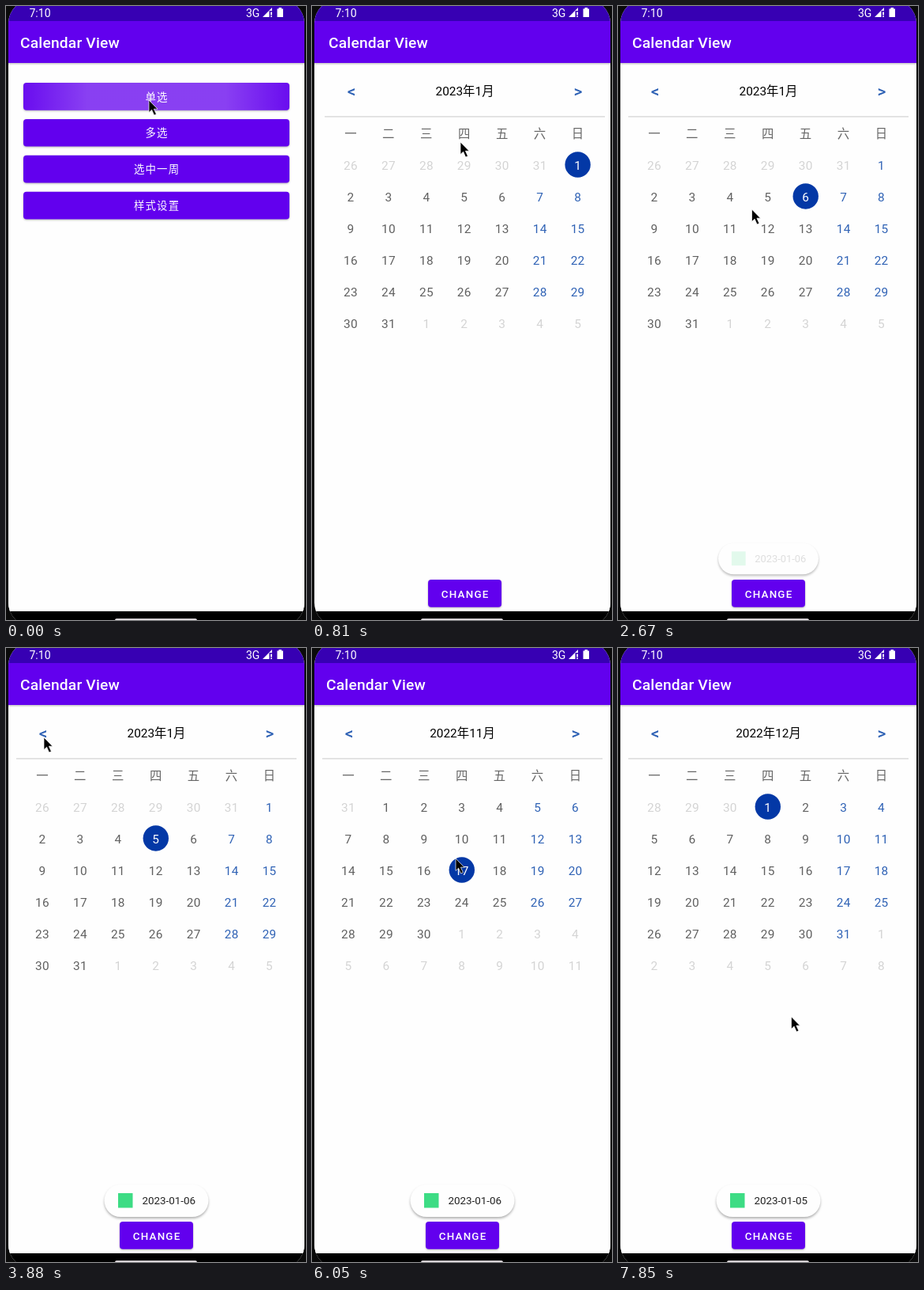
Write an HTML page that moves like this. It is 380 by 776 pixels and loops after 8000 ms.

```html
<!DOCTYPE html>
<html lang="zh-CN">
<head>
<meta charset="utf-8">
<title>Calendar View</title>
<style>
html, body { margin: 0; width: 100%; height: 100%; overflow: hidden; background: #0a0a0a; }
svg { display: block; font-family: Roboto, 'Noto Sans CJK SC', 'Noto Sans CJK', sans-serif; }
.btn { filter: drop-shadow(0 1.2px 1px rgba(0, 0, 0, .28)); }
.pill { filter: drop-shadow(0 2px 1.8px rgba(0, 0, 0, .3)); }
.label { font-size: 13.4px; letter-spacing: 1.2px; font-weight: 500; }
.title { font-size: 19.2px; letter-spacing: .2px; font-weight: 500; }
.day { font-size: 15.4px; letter-spacing: .3px; }
.month { font-size: 15.4px; }
.arrow { font-size: 21px; font-weight: 500; }
.small { font-size: 13.4px; }
</style>
</head>
<body>
<svg width="380" height="776" viewBox="0 0 380 776">
  <defs>
    <clipPath id="screen"><rect x="3" y="-8" width="375" height="792" rx="30"/></clipPath>
    <clipPath id="pager"><rect x="13" y="176" width="355" height="245"/></clipPath>
    <linearGradient id="ripple">
      <stop offset="0" stop-color="#fff" stop-opacity=".05"/>
      <stop offset=".24" stop-color="#fff" stop-opacity=".25"/>
      <stop offset=".76" stop-color="#fff" stop-opacity=".25"/>
      <stop offset="1" stop-color="#fff" stop-opacity=".05"/>
    </linearGradient>
    <linearGradient id="shade" x2="0" y2="1">
      <stop offset="0" stop-opacity=".22"/><stop offset="1" stop-opacity="0"/>
    </linearGradient>
  </defs>
  <g clip-path="url(#screen)">
    <rect width="380" height="776" fill="#fefefe"/>
    <rect y="19" width="380" height="53" fill="#6200ee"/>
    <g id="app"></g>
    <rect y="72" width="380" height="3" fill="url(#shade)"/>
    <rect width="380" height="19" fill="#3700b3"/>
    <g fill="#fff" font-size="14">
      <text x="29.5" y="14">7:10</text>
      <text x="304" y="14">3G</text>
      <path d="M325 14L337 2V6H333.5V14Z"/>
      <path d="M335.2 7.5h1.8v4h-1.8zM335.2 12.4h1.8v1.6h-1.8z"/>
      <path d="M345.5 2h3.5v1.4h2V14h-7.5V3.4h2z"/>
    </g>
    <rect y="765" width="380" height="11" fill="#000"/>
    <rect x="138" y="774.3" width="104" height="5" rx="2" fill="#ece6ea"/>
  </g>
  <path id="pointer" stroke="#fff" stroke-width=".7" d="M0 0V15.5L3.6 12.2L6.6 19L9.4 17.7L6.4 11.2H11Z"/>
</svg>
<script>
const LOOP = 8000, PAGE = 355, PURPLE = '#6200ee', BLUE = '#2f62b5';
const app = document.getElementById('app'), pointer = document.getElementById('pointer');

// Pointer stops: arrival time, x, y. A move takes at most REACH ms, the rest is waiting.
const REACH = 530;
const stops = [[0, 181, 119], [810, 188, 172], [1210, 206, 219], [1900, 253, 259],
  [2670, 169.5, 257], [3220, 200, 260], [3600, 66, 52], [3880, 48, 113], [4440, 48, 113],
  [4710, 172.5, 287], [4980, 200, 322], [5500, 184, 244], [5750, 182, 266],
  [6880, 189.5, 366], [7850, 219.5, 466]];

// Picked days: time, month offset from November 2022, day.
const picks = [[0, 2, 1], [2240, 2, 6], [3200, 2, 5], [6050, 0, 17], [7200, 1, 1]];
const toasts = [['2023-01-06', 2640, 6280], ['2023-01-05', 6760, LOOP]];

const ramp = (t, start, length) => Math.min(1, Math.max(0, (t - start) / length));
const ease = p => p * p * (3 - 2 * p);
const slide = (t, start) => ease(ramp(t, start, 160));

// Which month the pager shows: two swipes back, later one forward.
const pagerAt = t => 2 - slide(t, 4160) - slide(t, 4440) + slide(t, 7130);

function pointerAt(t) {
  const i = stops.findIndex(s => s[0] > t);
  if (i < 0) return stops[stops.length - 1].slice(1);
  const [t0, x0, y0] = stops[i - 1], [t1, x1, y1] = stops[i];
  const length = Math.min(REACH, t1 - t0);
  const p = ease(ramp(t, t1 - length, length));
  return [x0 + (x1 - x0) * p, y0 + (y1 - y0) * p];
}

const text = (s, x, y, cls, fill, anchor = 'middle') =>
  `<text x="${x}" y="${y}" class="${cls}" fill="${fill}" text-anchor="${anchor}">${s}</text>`;

const rect = (x, y, w, h, fill, more = '') =>
  `<rect x="${x}" y="${y}" width="${w}" height="${h}" fill="${fill}" ${more}/>`;

const group = (x, body, opacity = 1) =>
  `<g transform="translate(${x})" opacity="${opacity}">${body}</g>`;

const button = (x, y, w, label, over = '') =>
  rect(x, y, w, 34.7, PURPLE, 'rx="4" class="btn"') + over +
  text(label, x + w / 2 + .6, y + 22.5, 'label', '#fff');

const page = body => rect(3, 72, 400, 693, '#fefefe') + rect(3, 19, 400, 53, PURPLE) +
  text('Calendar View', 18, 53, 'title', '#fff', 'start') + body;

function menu(t) {
  const glow = rect(22, 97, 337, 34.7, 'url(#ripple)', `rx="4" opacity="${1 - ramp(t, 300, 300)}"`);
  return page(['单选', '多选', '选中一周', '样式设置']
    .map((s, i) => button(22, 97 + i * 45.9, 337, s, i ? '' : glow)).join(''));
}

const colX = i => 46 + 47.93 * i;

function grid(index, [, pickedMonth, pickedDay]) {
  const first = new Date(2022, 10 + index, 1), lead = (first.getDay() + 6) % 7;
  let out = '';
  for (let i = 0; i < 42; i++) {
    const date = new Date(2022, 10 + index, 1 - lead + i), day = date.getDate();
    const x = colX(i % 7), y = 201 + 40 * Math.floor(i / 7);
    const inside = date.getMonth() === first.getMonth();
    const on = inside && pickedMonth === index && pickedDay === day;
    if (on) out += `<circle cx="${x}" cy="${y - .5}" r="16.2" fill="#0338a6"/>`;
    const fill = on ? '#fff' : !inside ? '#d4d4d4' : i % 7 > 4 ? BLUE : '#606060';
    out += text(day, x, y + 5.5, 'day', fill);
  }
  return out;
}

function calendar(t) {
  const pos = pagerAt(t), pick = picks.filter(p => p[0] <= t).pop();
  const shown = new Date(2022, 10 + Math.round(pos), 1);
  const months = [0, 1, 2].filter(i => Math.abs(i - pos) < 1)
    .map(i => group((i - pos) * PAGE, grid(i, pick))).join('');
  const week = [...'一二三四五六日'].map((s, i) => text(s, colX(i), 166.5, 'day', '#666')).join('');
  return page(
    text('&lt;', 47, 115, 'arrow', BLUE) + text('&gt;', 334, 115, 'arrow', BLUE) +
    text(`${shown.getFullYear()}年${shown.getMonth() + 1}月`, 190.5, 113, 'month', '#000') +
    rect(13, 139, 355, 1.6, '#dedede') + week +
    `<g clip-path="url(#pager)">${months}</g>` + button(144, 725, 93, 'CHANGE'));
}

function toast([label, start, end], t) {
  const a = ramp(t, start, 220) * (1 - ramp(t, end, 220));
  if (!a) return '';
  return `<g transform="translate(190.5 698.5) scale(${.955 + .045 * a}) translate(-190.5 -698.5)">` +
    rect(124.5, 678, 132, 41, '#fefefe', `rx="20.5" class="pill" opacity="${Math.min(1, a * 6)}"`) +
    group(0, rect(142, 689, 18.5, 18.5, '#3ddc84') +
      text(label, 172.5, 703.2, 'small', '#222', 'start'), a) + '</g>';
}

function draw(t) {
  const left = (1 - ramp(t, 500, 550)) ** 3, fade = ramp(t, 500, 100);
  let out = '';
  if (fade < 1) out += group(-37 * (1 - left), menu(t));
  if (fade > 0) out += group(37 * left, calendar(t), fade);
  app.innerHTML = out + toasts.map(k => toast(k, t)).join('');
  pointer.setAttribute('transform', `translate(${pointerAt(t)})`);
}

function frame() {
  draw(performance.now() % LOOP);
  requestAnimationFrame(frame);
}
frame();
</script>
</body>
</html>
```
